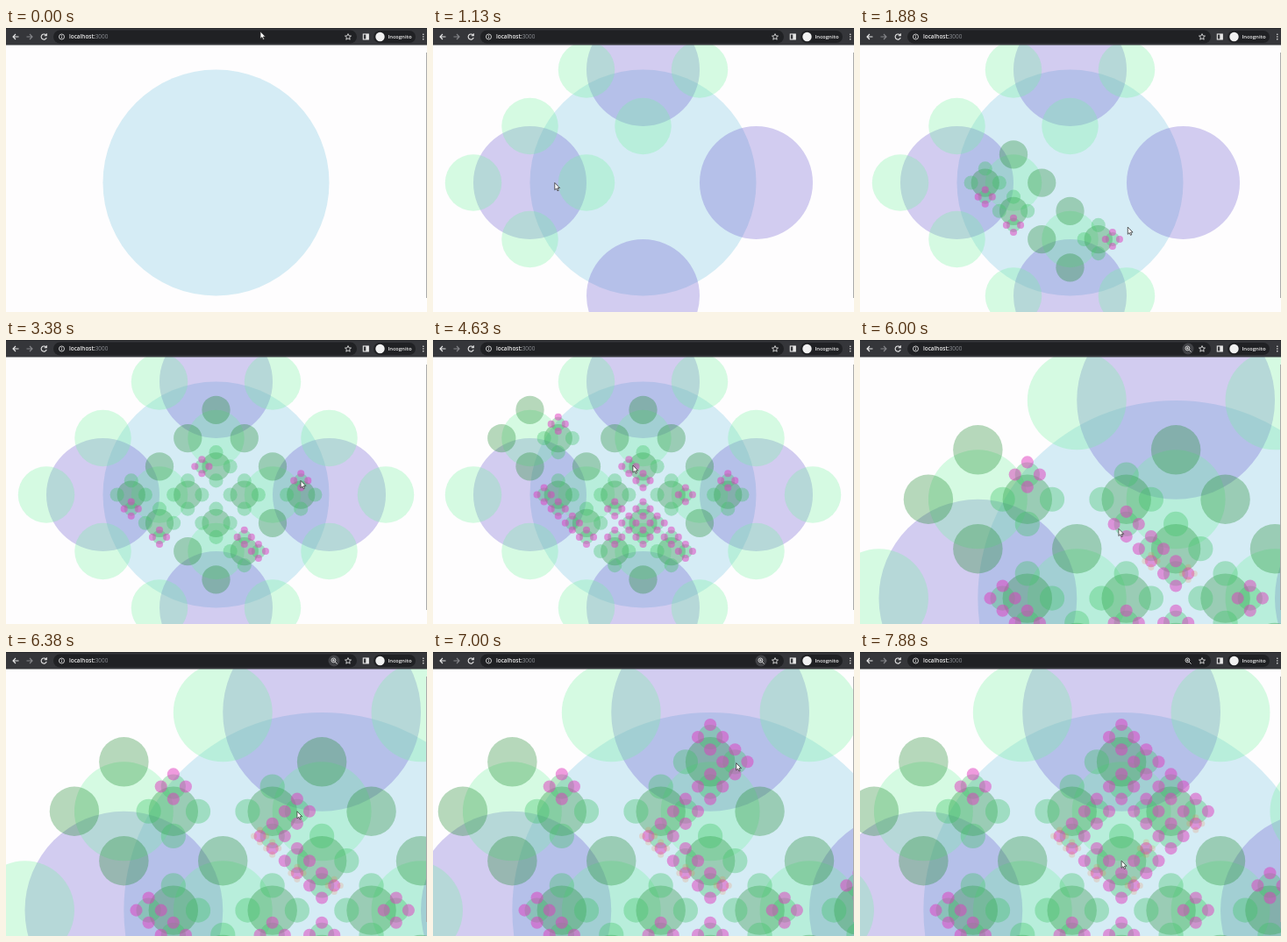
Recreate the animation shown at these times as an HTML page with a canvas. Size 480x324 px, loop 8 s.

```html
<!DOCTYPE html>
<html lang="en">
<head>
<meta charset="utf-8">
<title>Circle fractal</title>
<style>
  html, body { margin: 0; width: 100%; height: 100%; overflow: hidden; background: #fefdfe; }
  canvas, svg { position: absolute; left: 0; top: 0; width: 480px; height: 324px; }
  text { font: 600 6.4px "Open Sans", Roboto, sans-serif; fill: #eee; }
  .line { fill: none; stroke: #e8e8e8; stroke-width: 1.1; }
  .thin { stroke-width: .85; }
  .dim { stroke: #85868a; }
</style>
</head>
<body>
<canvas id="page" width="480" height="324"></canvas>
<svg viewBox="0 0 480 324">
  <rect width="480" height="19.5" fill="#35363a"/>
  <rect width="480" height="1" fill="#28292c"/>
  <rect x="54" y="2.5" width="346" height="15" rx="7.5" fill="#202124"/>
  <path class="line" d="M14.5 10H8M11 7l-3 3 3 3"/>
  <path class="line dim" d="M23.5 10H30M27 7l3 3-3 3"/>
  <path class="line" d="M45.6 8A3.1 3.1 0 1 0 46.2 11M46.3 6.3V8.7H43.8"/>
  <circle class="line thin" cx="63.5" cy="10" r="3"/>
  <path class="line thin" d="M63.5 9.6v2M63.5 8v.8"/>
  <text x="72" y="12.3">localhost:<tspan fill="#8d9095" font-weight="400">3000</tspan></text>
  <g id="lens">
    <circle id="chip" cx="374" cy="10" r="6.5" fill="#414246"/>
    <circle class="line thin" cx="373.4" cy="9.4" r="2.4"/>
    <path class="line thin" d="M375.2 11.2l2.4 2.4M372.2 9.4h2.4M373.4 8.2v2.4"/>
  </g>
  <path class="line thin" d="M390 6.6l1 2.3 2.5.2-1.9 1.6.6 2.5-2.2-1.3-2.2 1.3.6-2.5-1.9-1.6 2.5-.2z"/>
  <rect class="line" x="407.3" y="7" width="6" height="6"/>
  <rect x="410.3" y="7" width="3" height="6" fill="#e8e8e8"/>
  <rect x="419" y="3" width="48" height="14" rx="7" fill="#202124"/>
  <circle cx="426.5" cy="10" r="5.2" fill="#f1f1f1"/>
  <text x="435.5" y="12.2" style="font-size:6px">Incognito</text>
  <path d="M475.8 7.2v.01m0 2.8v.01m0 2.8v.01" stroke="#e8e8e8" stroke-width="1.6" stroke-linecap="round"/>
  <path d="M479.5 28V308" stroke="#aaa"/>
  <path id="cursor" d="M0 0V8.2L1.9 6.5 3.2 9.3 4.5 8.7 3.3 6H5.8Z" fill="#fff" stroke="#333" stroke-width=".8"/>
</svg>
<script>
const LOOP = 8000, STEP = 125, R = 129;
const MID = 239.5, BAR = 19, DROP = 157.5;   // root centre, and toolbar height
const $ = id => document.getElementById(id);
const ctx = $('page').getContext('2d');

// One fill per depth, largest circles first.
const FILLS = [
  'rgba(115,195,222,.3)', 'rgba(106,90,205,.3)', 'rgba(115,240,160,.3)',
  'rgba(30,138,45,.32)', 'rgba(60,195,100,.35)', 'rgba(224,58,190,.5)',
  'rgba(240,130,70,.2)'
];
const DIRS = { U: [0, -1], R: [1, 0], D: [0, 1], L: [-1, 0] };

// The pointer visits circles, each named by its path from the root,
// evenly spaced between the start and end of a leg.
const LEGS = [
  [375, 375, 'U'],
  [1000, 1800, 'L LRL LRLD LRDD DU DURR'],
  [2050, 3370, 'R DURU RLL DUU LRR UDDL RLRU'],
  [3500, 4370, 'RLLR DUUR DUUD DUUU DUUL LRRD DULU LRDL LRLL LURU UDDD'],
  [5000, 5250, 'UDL UDLD'],
  [5700, 6375, 'UDDDR UDDLD UDLDL UDLDD UDLR'],
  [6550, 6980, 'UDUD UDUU UDUR'],
  [7130, 7860, 'UDRU UDRR UDRRD UDRD UDRL UDDRU UDD']
];
const ZOOMS = [1, 1.1, 1.25, 1.5, 1.75];

const clamp = (v, lo, hi) => Math.min(hi, Math.max(lo, v));
const mix = (a, b, f) => a + (b - a) * f;

function ease(t, from, to) {
  const f = clamp((t - from) / (to - from), 0, 1);
  return f * f * (3 - 2 * f);
}

function circle(path) {
  let x = 0, y = 0, r = R;
  for (const step of path) {
    x += DIRS[step][0] * r;
    y += DIRS[step][1] * r;
    r /= 2;
  }
  return { x, y, r, depth: path.length, time: 0 };
}

const circles = [circle('')];
const stops = [{ time: 0, x: 50.5, y: -172.5 }];
const split = new Set();

// Visiting a circle splits it and every circle above it into four.
function visit(path, time) {
  stops.push({ ...circle(path), time });
  for (let n = 0; n <= path.length; n++) {
    const part = path.slice(0, n);
    if (split.has(part)) continue;
    split.add(part);
    for (const dir in DIRS) circles.push({ ...circle(part + dir), time });
  }
}

for (const [start, end, names] of LEGS) {
  const list = names.split(' ');
  const gap = (end - start) / Math.max(1, list.length - 1);
  list.forEach((path, i) => visit(path, start + i * gap));
}
circles.sort((a, b) => a.depth - b.depth);

function pointer(t) {
  const next = stops.findIndex(s => s.time > t);
  if (next < 0) return stops[stops.length - 1];
  const a = stops[next - 1], b = stops[next];
  const f = ease(t, a.time, b.time);
  return { x: mix(a.x, b.x, f), y: mix(a.y, b.y, f) };
}

function draw(t) {
  const zoom = ZOOMS[clamp(Math.floor((t - 4500) / 250), 0, 4)];
  const scroll = 59 * ease(t, 5600, 6000) + 44 * ease(t, 6500, 6900) + 18 * ease(t, 7100, 7400);
  const left = MID * zoom - scroll, top = BAR + DROP * zoom;

  ctx.setTransform(1, 0, 0, 1, 0, 0);
  ctx.fillStyle = '#fefdfe';
  ctx.fillRect(0, 0, 480, 324);
  ctx.setTransform(zoom, 0, 0, zoom, left, top);
  for (const c of circles) {
    if (c.time > t) continue;
    ctx.fillStyle = FILLS[c.depth];
    ctx.beginPath();
    ctx.arc(c.x, c.y, c.r, 0, 2 * Math.PI);
    ctx.fill();
  }

  const p = pointer(t);
  $('cursor').setAttribute('transform', `translate(${left + p.x * zoom} ${top + p.y * zoom})`);
  $('lens').style.display = zoom > 1 ? '' : 'none';
  $('chip').style.display = t < 7125 ? '' : 'none';
}

const start = performance.now();
function tick() {
  const t = (performance.now() - start) % LOOP;
  draw(Math.floor(t / STEP) * STEP);
  requestAnimationFrame(tick);
}
tick();
</script>
</body>
</html>
```
